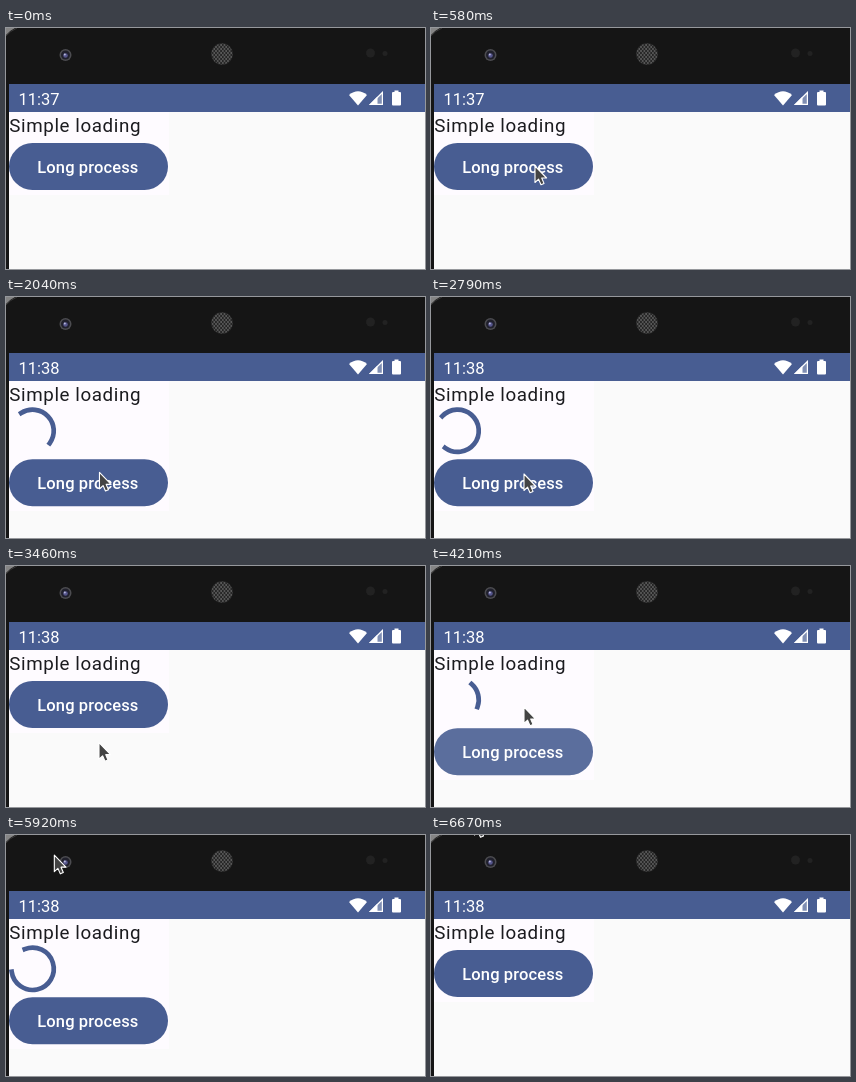
An HTML page for the animation above (6790 ms loop, 419 by 241 pixels).

```html
<!DOCTYPE html>
<html lang="en">
<head>
<meta charset="utf-8">
<title>Simple loading</title>
<style>
  html, body { margin: 0; width: 419px; height: 241px; overflow: hidden; background: #151515; }
  svg { display: block; }
  text { font-family: Roboto, sans-serif; }
</style>
</head>
<body>
<svg width="419" height="241" viewBox="0 0 419 241">
  <defs>
    <pattern id="mesh" width="3.4" height="4" patternUnits="userSpaceOnUse">
      <circle cx=".9" cy="1" r=".8" fill="#858585"/>
      <circle cx="2.6" cy="3" r=".8" fill="#858585"/>
    </pattern>
  </defs>

  <!-- Phone bezel -->
  <rect width="419" height="241" fill="#151515"/>
  <path d="M0 0H9Q3 3 0 7Z" fill="#858585"/>
  <path d="M0 8Q4 3 11 0" fill="none" stroke="#3a3a3a"/>
  <circle cx="59.500" cy="27" r="6" fill="#4c4c50"/>
  <circle cx="59.500" cy="27" r="4.500" fill="#20202c"/>
  <circle cx="59.500" cy="27.500" r="2.300" fill="#55558c"/>
  <circle cx="58.800" cy="26.500" r="1" fill="#b9b9dc"/>
  <circle cx="216" cy="26" r="11" fill="#262626"/>
  <circle cx="216" cy="26" r="10.500" fill="url(#mesh)"/>
  <circle cx="364.500" cy="25" r="4.500" fill="#222"/>
  <circle cx="379" cy="25.500" r="2.500" fill="#222"/>

  <!-- Screen and status bar -->
  <rect x="3" y="56" width="416" height="185" fill="#fafafa"/>
  <rect x="3" y="56" width="416" height="28" fill="#485d92"/>
  <text id="clock" x="12.500" y="76.500" font-size="16.500" fill="#fff">11:37</text>
  <g fill="#fff">
    <path d="M343 67Q352 59.500 361 67L352 77.500Z"/>
    <path d="M377 63V77H363Z" fill-opacity=".3"/>
    <path d="M371.500 68.500V77H363Z"/>
    <path d="M376.400 64.500V76.400H364.500Z" fill="none" stroke="#fff" stroke-width="1.200"/>
    <path d="M388.500 62.500H392.500V64H394Q395 64 395 65V76.500Q395 77.500 394 77.500H387Q386 77.500 386 76.500V65Q386 64 387 64H388.500Z"/>
  </g>

  <!-- App content -->
  <rect id="column" x="3" y="84" width="160" height="83" fill="#fefbff"/>
  <text x="3.300" y="104" font-size="18.800" letter-spacing=".59" fill="#1b1b1f">Simple loading</text>
  <path id="spinner" fill="none" stroke="#485d92" stroke-width="4.700" stroke-linecap="square"/>
  <g id="button">
    <rect x="3" y="115" width="159" height="47" rx="23.500" fill="#485d92"/>
    <rect id="ripple" x="3" y="115" width="159" height="47" rx="23.500" fill="#fff" opacity="0"/>
    <text x="31.300" y="144.500" font-size="16.500" font-weight="500" letter-spacing=".12" fill="#fff">Long process</text>
  </g>

  <path id="cursor" d="M0 0V16.500L3.600 13.200L6 18.700L9 17.400L6.700 12H11.600Z" fill="#444" stroke="#fff" stroke-width="1.100" stroke-linejoin="round"/>
</svg>

<script>
const LOOP = 6790, FPS = 24;
const TURN = 1332, BASE = 286, JUMP = 290;
const CENTER = { x: 26.6, y: 133.8 }, RADIUS = 21.15, CAP = 5.73;
const el = id => document.getElementById(id);
const [clock, column, spinner, button, ripple, cursor] =
  ['clock', 'column', 'spinner', 'button', 'ripple', 'cursor'].map(el);

const clamp = v => Math.min(1, Math.max(0, v));
const smooth = p => p * p * (3 - 2 * p);

// Keys are [time, ...values]; each segment is interpolated with the given easing.
function track(keys, t, ease = p => p) {
  let i = 0;
  while (i < keys.length - 2 && t >= keys[i + 1][0]) i++;
  const [a, b] = [keys[i], keys[i + 1]];
  const p = ease(clamp((t - a[0]) / (b[0] - a[0])));
  return a.slice(1).map((v, n) => v + (b[n + 1] - v) * p);
}

// cubic-bezier(.4, 0, .2, 1)
function fastOutSlowIn(x) {
  x = clamp(x);
  let lo = 0, hi = 1;
  for (let i = 0; i < 20; i++) {
    const s = (lo + hi) / 2, r = 1 - s;
    if (1.2 * r * r * s + 0.6 * r * s * s + s ** 3 < x) lo = s; else hi = s;
  }
  return lo * lo * (3 - 2 * lo);
}

const runs = [
  { press: 1040, start: 1040, end: 3080,
    spin: [[1035, 0], [1167, 132], [1250, 135], [1750, 595], [2458, 1303], [2620, 1303], [2622, 1590], [3100, 2068]] },
  { press: 3998, start: 4040, end: 6080, spin: [[4042, 0], [6100, 2058]] }
];

const pointer = [
  [40, 112, 19], [200, 92, 72], [375, 97, 122], [583, 104, 138], [1750, 104, 138],
  [2083, 93, 177], [3440, 93, 177], [3750, 93, 141], [5400, 93, 141], [6083, 40.5, -1],
  [6125, 40.5, -6], [6260, 40.5, -6], [6458, 41, -16], [6650, 41, -16], [6667, 43.5, -16.5], [LOOP, 43.5, -16.5]
];

function arcPath(from, sweep) {
  const point = deg => {
    const a = deg * Math.PI / 180;
    return `${(CENTER.x + RADIUS * Math.sin(a)).toFixed(3)} ${(CENTER.y - RADIUS * Math.cos(a)).toFixed(3)}`;
  };
  return `M${point(from)}A${RADIUS} ${RADIUS} 0 ${sweep > 180 ? 1 : 0} 1 ${point(from + sweep)}`;
}

function spinnerPath(t) {
  const cycle = Math.floor(t / TURN), p = t / TURN - cycle;
  const head = JUMP * fastOutSlowIn(p * 2);
  const tail = JUMP * fastOutSlowIn(p * 2 - 1);
  return arcPath(cycle * (BASE + JUMP) + BASE * p + tail + CAP, Math.max(head - tail, 0.3));
}

function rippleAlpha(age) {
  return age < 0 ? 0 : 0.1 * clamp((age + 30) / 100) * (1 - clamp((age - 250) / 300));
}

function render(ms) {
  const t = Math.floor(ms * FPS / 1000 + 0.13) * 1000 / FPS;
  const run = runs.find(r => t >= r.start && t < r.end - 2);

  clock.textContent = t < 1040 ? '11:37' : '11:38';
  column.setAttribute('height', run ? 130 : 83);
  button.setAttribute('transform', `translate(0 ${run ? 47.2 : 0})`);
  spinner.setAttribute('d', run ? spinnerPath(track(run.spin, t)[0]) : '');
  ripple.setAttribute('opacity', Math.max(...runs.map(r => rippleAlpha(t - r.press))));

  const [x, y] = track(pointer, t, t > 600 ? smooth : undefined);
  cursor.setAttribute('transform', `translate(${x} ${y})`);
  cursor.setAttribute('visibility', t < 40 ? 'hidden' : 'visible');
}

const began = performance.now();
function tick() {
  render((performance.now() - began) % LOOP);
  requestAnimationFrame(tick);
}
render(0);
requestAnimationFrame(tick);
</script>
</body>
</html>
```
